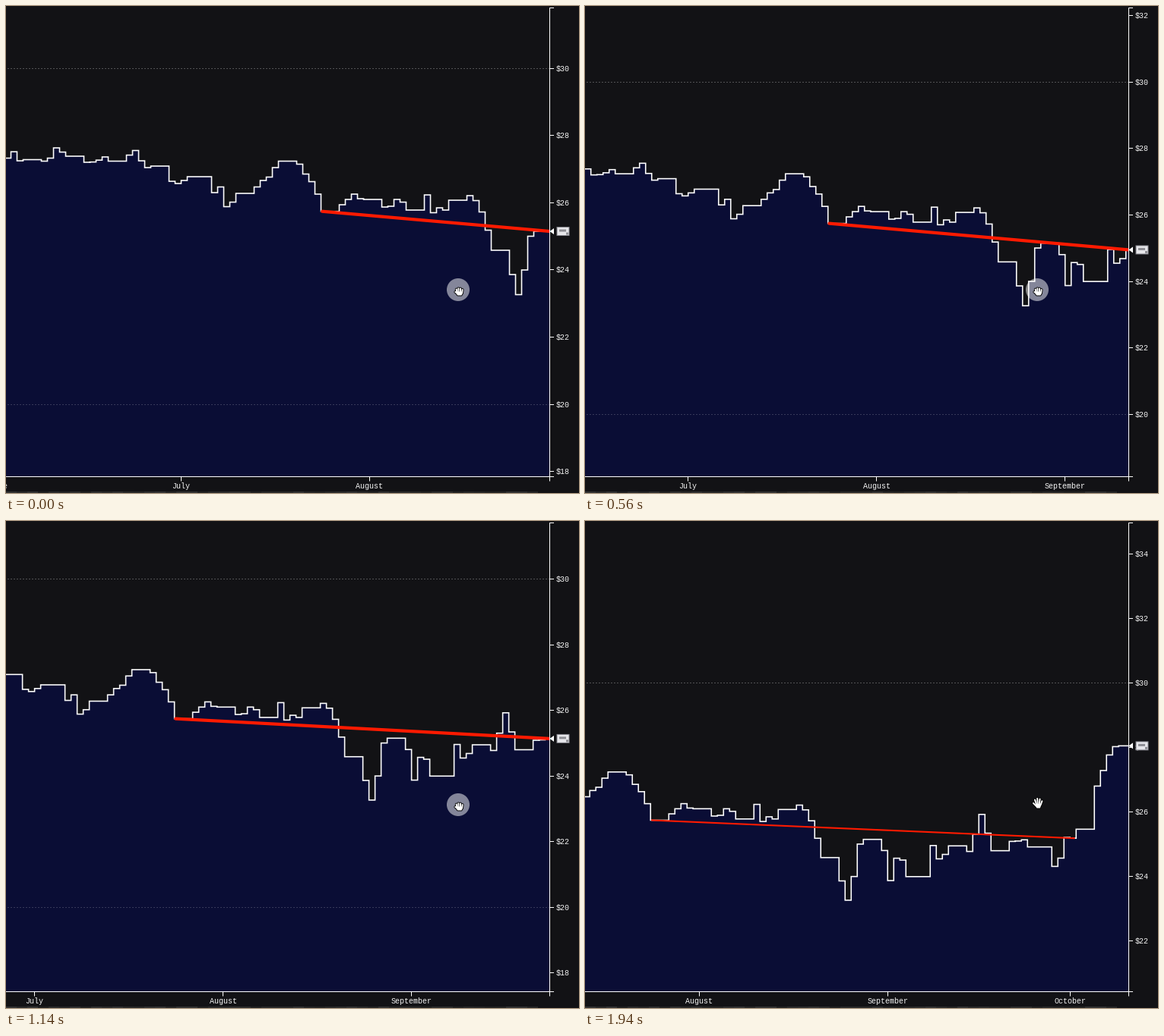
A matplotlib script for the animation above (1960 ms loop, 754 px wide and 642 px high).

```python
import numpy as np
import matplotlib.pyplot as plt
from matplotlib.animation import FuncAnimation
from matplotlib.patches import Circle, Polygon, Rectangle

plt.rcParams["path.snap"] = False

W, H, DPI = 754, 642, 100
FRAMES, STEP = 98, 20
RIGHT, BOTTOM = 715.5, 620.5
DAY, JULY, SPEED = 8, 230.5, 0.1692
FIRST = -30
ENTRY, EXIT = 23.2, 92.7
CLOSE = (JULY + DAY * EXIT - RIGHT) / SPEED
BG, NAVY, RED, GREEN = "#121215", "#0a0d35", "#ff1a00", "#06d00e"
PT = 72 / DPI

# Daily prices, starting on the first of June
PRICES = np.array([
    27.33, 27.33, 27.52, 27.25, *[27.285] * 3, 27.24, 27.33, 27.635, 27.51,
    *[27.387] * 3, 27.206, 27.215, 27.27, 27.365, *[27.24] * 3, 27.42, 27.557,
    27.25, 27.048, *[27.093] * 3, 26.64, 26.574, 26.665, *[26.777] * 4, 26.303,
    26.472, 25.885, 26.02, *[26.28] * 3, 26.472, 26.665, 26.766, 27.048,
    *[27.24] * 3, 27.15, 26.856, 26.63, 26.258, *[25.745] * 3, 25.942, 26.10,
    26.258, 26.122, *[26.10] * 3, 25.874, 25.897, 26.10, 26.02, *[25.784] * 3,
    26.235, 25.705, 25.85, 25.784, *[26.077] * 3, 26.213, 26.066, 25.727,
    25.185, *[24.587] * 3, 23.864, 23.266, 24.0, 25.005, *[25.151] * 3, 24.806,
    23.874, 24.567, 24.51, *[23.997] * 4, 24.96, 24.547, 24.685, *[24.95] * 3,
    24.777, 25.305, 25.925, 25.342, *[24.80] * 3, 25.088, 25.10, 25.138,
    *[24.917] * 4, 24.313, 24.57, 25.213, 25.186, *[25.466] * 3, 26.803,
    27.285, 27.767, 28.025, 28.05, 28.05])
DAYS = FIRST + np.arange(len(PRICES))
MONTHS = {"June": -30, "July": 0, "August": 31, "September": 62, "October": 92}


def price(day):
    i = np.floor(day).astype(int) - FIRST
    return PRICES[np.clip(i, 0, len(PRICES) - 1)]


def today(t):
    return (RIGHT - JULY + SPEED * t) / DAY


def drift(t):
    off = np.linspace(-3, 4, 57)
    weight = np.exp(-((off - 0.5) / 1.3) ** 2 / 2)
    return (price(today(t) + off) * weight).sum() / weight.sum()


# The view follows the smoothed price, passing through these mid prices
KEY_T = [0, 320, 800, 1140, 1440, 1660, 1940]
KEY_MID = [24.858, 24.238, 25.95, 24.604, 24.617, 25.821, 27.73]
KEY_OFF = [m - drift(t) for t, m in zip(KEY_T, KEY_MID)]


def view(t):
    scale = 44.28 - 0.000897 * t
    mid = drift(t) + np.interp(t, KEY_T, KEY_OFF)
    return (lambda d: JULY + DAY * d - SPEED * t,
            lambda p: 310 + (mid - p) * scale)


fig = plt.figure(figsize=(W / DPI, H / DPI), dpi=DPI, facecolor=BG)
ax = fig.add_axes([0, 0, 1, 1])
ax.set_xlim(0, W)
ax.set_ylim(H, 0)
ax.axis("off")


def line(xs=(), ys=(), color="white", px=1.0, z=5, **kw):
    return ax.plot(xs, ys, color=color, lw=px * PT, zorder=z, **kw)[0]


def label(s, ha="left", px=10):
    return ax.text(0, 0, s, color="#f2f2f2", family="Liberation Mono",
                   size=px * PT, ha=ha, va="baseline", zorder=6)


def note(z, edge="#85858c", ink="#8e8e94"):
    return [ax.add_patch(Rectangle((0, 0), w, h, fc=c, ec="none", zorder=z))
            for w, h, c in ((17, 12, edge), (15, 10, "#e6e6ea"),
                            (9, 3, ink), (3, 3, ink))]


def place_note(parts, x, y, flip=False):
    spots = ((-8.5, -6), (-7.5, -5), (-5, -2.5 + flip * 2),
             (4, 1.5 - flip * 4))
    for part, (dx, dy) in zip(parts, spots):
        part.set_xy((x + dx, y + dy))


def hand(fingers, palm, black=3.8, white=2.0):
    outline = Polygon(palm, fc="white", ec="black", lw=1.4, zorder=20,
                      joinstyle="round")
    parts = [(ax.add_patch(outline), np.array(palm))]
    for pts in fingers:
        for color, px, z in (("black", black, 21), ("white", white, 22)):
            art = line(color=color, px=px, z=z, solid_capstyle="round")
            parts.append((art, np.array(pts)))
    inner = Polygon(palm, fc="white", ec="none", zorder=23)
    parts.append((ax.add_patch(inner), np.array(palm)))
    return parts


def place_hand(parts, x, y, shown):
    for art, pts in parts:
        art.set_visible(shown)
        moved = pts + (x, y)
        if isinstance(art, Polygon):
            art.set_xy(moved)
        else:
            art.set_data(moved[:, 0], moved[:, 1])


plot_box = Rectangle((0, 0), RIGHT, BOTTOM, transform=ax.transData)
area = ax.add_patch(Polygon([(0, 0)], fc=NAVY, ec="none", zorder=1))
curve = line(px=1.6, z=3, solid_joinstyle="miter", solid_capstyle="butt")
for art in (area, curve):
    art.set_clip_path(plot_box)
trade = line(z=4, solid_capstyle="round")
trade.set_clip_path(plot_box)

AXIS = dict(solid_capstyle="butt", solid_joinstyle="miter")
line([RIGHT + 5.5, RIGHT, RIGHT, RIGHT + 5.5], [2.5, 2.5, BOTTOM, BOTTOM],
     **AXIS)
line([0, RIGHT, RIGHT], [BOTTOM, BOTTOM, BOTTOM + 6], **AXIS)
grids = {v: line(color="white", alpha=a, z=2, dashes=(2, 2),
                 dash_capstyle="butt")
         for v, a in ((30, 0.27), (20, 0.18))}
dollars = {v: (line(**AXIS), label(f"${v}")) for v in range(16, 38, 2)}
months = {m: (line(**AXIS), label(m, "center")) for m in MONTHS}

# Faint strip along the lower edge
rng = np.random.default_rng(4)
for x in range(0, 700, 14):
    g = rng.uniform(0.12, 0.2)
    ax.add_patch(Rectangle((x, 640), 14, 2, fc=(g, g, g), ec="none"))

arrow = ax.add_patch(Polygon([(0, 0)], fc="white", ec="none", zorder=7))
tag = note(8)
bills = [note(10 + i, "#f4f4f4", "#d6d6da") for i in range(4)]
bills.append(note(14))
scatter = rng.uniform(-5, 4, (5, 2))
scatter[-1] = (3, -10)

COINS = [(162, 171), (185, 175), (214, 179), (242, 189), (265, 195), (296, 198)]
coins = [label("$", "center", 11) for _ in COINS]

press = ax.add_patch(Circle((595, 374), 15, fc="white", ec="none", alpha=0.5,
                            zorder=19))
fist = hand([[(-3.6, -2.5), (-3, 1)], [(-1, -3.7), (-1, 1)],
             [(1.7, -3.5), (1.5, 1)], [(4.3, -2), (3.8, 2)],
             [(-5, 1), (-3, 2)]],
            [(-3.8, 0.5), (4.8, 0.5), (4.3, 3.5), (3, 5.5), (-2, 5.5), (-4, 3)])
palm = hand([[(-4, -4.5), (-2, 1.5)], [(-0.8, -6.2), (-0.3, 1)],
             [(2.6, -5.5), (1.8, 1)], [(5.4, -2.8), (3.5, 2.5)],
             [(-6, 0), (-2.5, 3.5)]],
            [(-2.5, 1), (4, 1), (3.8, 4), (2.8, 6.5), (-1.5, 6.5), (-3.5, 3.5)])


def draw(i):
    t = i * STEP
    to_x, to_y = view(t)
    now = float(today(t))
    last = float(price(now))
    tip = to_y(last)
    closed = t > CLOSE

    live = DAYS <= now
    xs = np.append(to_x(DAYS[live]), RIGHT + 1)
    ys = to_y(PRICES[live])
    sx = np.repeat(xs, 2)[1:-1]
    sy = np.repeat(ys, 2)
    curve.set_data(sx, sy)
    area.set_xy([(sx[0], BOTTOM), *zip(sx, sy), (sx[-1], BOTTOM)])

    for v, (tick, text) in dollars.items():
        y = np.floor(to_y(v)) + 0.5
        shown = 3 < y < BOTTOM
        tick.set_data([RIGHT, RIGHT + 5.5], [y, y])
        text.set_position((723.5, y + 3.5))
        tick.set_visible(shown)
        text.set_visible(shown)
        if v in grids:
            grids[v].set_data([2, RIGHT], [y, y])
            grids[v].set_visible(shown)
    for m, (tick, text) in months.items():
        x = np.floor(to_x(MONTHS[m])) + 0.5
        tick.set_data([x, x], [BOTTOM, BOTTOM + 6])
        text.set_position((x, 636))
        tick.set_visible(0 <= x <= RIGHT)
        text.set_visible(-30 < x <= RIGHT)

    start = float(price(ENTRY))
    end_day, end = (EXIT, float(price(EXIT))) if closed else (now, last)
    trade.set_data([to_x(ENTRY), to_x(end_day)], [to_y(start), to_y(end)])
    trade.set_color(GREEN if end > start else RED)
    trade.set_linewidth((2.1 if closed else 4.2) * PT)

    arrow.set_xy([(RIGHT, tip), (721, tip - 4), (721, tip + 4)])
    place_note(tag, 733, tip, int(now) % 3 == 1)

    cy = 374 if t < 1300 else 372
    press.center = (595, cy)
    press.set_visible(not closed)
    place_hand(fist, 596.3, cy + 2, not closed)
    place_hand(palm, 596, 372, closed)

    # Closing the trade: notes fly to the hand, coins off to the upper left
    u = (t - CLOSE) / (1660 - CLOSE)
    f = 0.63 * max(u, 0) ** 2
    x, y = np.array([733, tip]) * (1 - f) + np.array([596, 372]) * f
    for k, (bill, (dx, dy)) in enumerate(zip(bills, scatter)):
        place_note(bill, x + dx, y + dy, k % 2)
        for part in bill:
            part.set_visible(u > 0 and f < 1)
    for coin, (x, y) in zip(coins, COINS):
        cx = 733 + (x - 733) * u
        coin.set_position((cx, 310 + (y - 310) * u + 3.5))
        coin.set_visible(u > 0 and cx > -6)
    return []


anim = FuncAnimation(fig, draw, frames=FRAMES, interval=STEP, repeat=True,
                     repeat_delay=0, blit=False)
plt.show()
```
